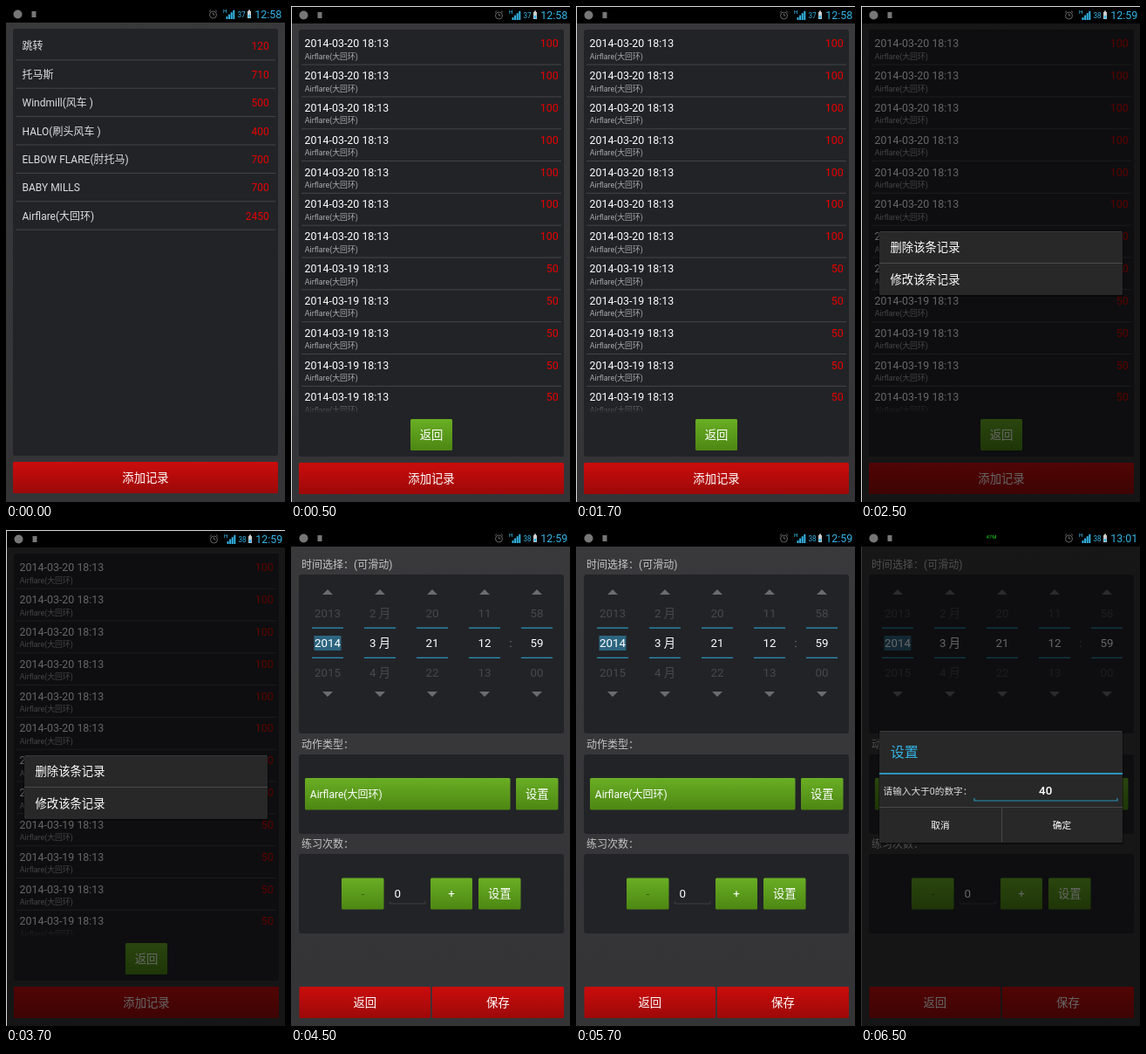
An HTML page that plays this animation: 320x568 px, repeating every 8 s.

```html
<!DOCTYPE html>
<html lang="zh-CN">
<head>
<meta charset="utf-8">
<style>
html, body { margin: 0; height: 100%; overflow: hidden; background: #000; }
svg { display: block; width: 100%; height: 100%; }
text { font-family: Roboto, "Noto Sans CJK SC", "Noto Sans CJK JP", sans-serif; white-space: pre; }
.colon { font-family: "Noto Sans CJK JP", "Noto Sans CJK TC", sans-serif; }
</style>
</head>
<body>
<svg viewBox="0 0 320 568">
  <defs>
    <linearGradient id="back" x2="0" y2="1"><stop stop-color="#39393b"/><stop offset="1" stop-color="#343437"/></linearGradient>
    <linearGradient id="red" x2="0" y2="1"><stop stop-color="#cb0c0c"/><stop offset="1" stop-color="#9c0909"/></linearGradient>
    <linearGradient id="green" x2="0" y2="1"><stop stop-color="#69ae24"/><stop offset="1" stop-color="#4d8713"/></linearGradient>
    <linearGradient id="fade" x2="0" y2="1"><stop stop-color="#222327" stop-opacity="0"/><stop offset="1" stop-color="#222327"/></linearGradient>
  </defs>
  <g id="stage"></g>
</svg>
<script>
const BLUE = '#33b5e5', RED = '#e80000', PANEL = '#222327';
const stage = document.getElementById('stage');

const rect = (x, y, w, h, fill, r = 0, more = '') =>
  `<rect x="${x}" y="${y}" width="${w}" height="${h}" fill="${fill}" rx="${r}" ${more}/>`;
const path = (d, fill, stroke = 'none', width = 1) =>
  `<path d="${d}" fill="${fill}" stroke="${stroke}" stroke-width="${width}"/>`;
const text = (x, y, str, size, fill = '#fff', anchor = 'start', weight = 400) =>
  `<text x="${x}" y="${y}" font-size="${size}" fill="${fill}" text-anchor="${anchor}" font-weight="${weight}">` +
  str.replace('：', '<tspan class="colon">：</tspan>') + '</text>';
const group = (x, y, body) => `<g transform="translate(${x} ${y})">${body}</g>`;
const panel = (y, h, x = 9) => rect(x, y, 304, h, PANEL, 3);
const button = (x, y, w, h, label, fill = 'url(#green)', color = '#fff') =>
  rect(x, y, w, h, fill, 1.5) +
  text(x + w / 2, y + h / 2 + 4.8, label, 13.33, color, 'middle');
const redButton = (x, w, y, label) => button(x, y, w, 36, label, 'url(#red)');
const backdrop = () => rect(0, 0, 320, 568, 'url(#back)');
const dim = () => rect(1, 19, 319, 549, '#000', 0, 'opacity=".6"');

function status(clock, charge) {
  let bars = '';
  for (let i = 0; i < 4; i++) bars += rect(252.5 + i * 2.6, 12 - i * 2.4, 2, 3 + i * 2.4, BLUE);
  return rect(-1, -1, 322, 20, '#000') +
    '<circle cx="13.5" cy="9.5" r="5" fill="#777"/>' +
    rect(29.5, 6, 5, 7, '#777') +
    '<circle cx="237.5" cy="10" r="4" fill="none" stroke="#666"/>' +
    path('M237.5 7.5V10H239.5M232.8 6.5L235 4.5M240 4.5L242.2 6.5', 'none', '#666') +
    text(249, 8, 'H', 6, BLUE, 'start', 500) + bars +
    text(265.5, 13, charge, 8.2, BLUE) +
    rect(278, 4.5, 2, 1.5, '#ccc') + rect(277, 6, 4, 8, '#ccc') + rect(277.8, 10, 2.4, 3.3, BLUE) +
    text(285.2, 14, clock, 12.44, BLUE);
}

const moves = [['跳转', 120], ['托马斯', 710], ['Windmill(风车 )', 500], ['HALO(刷头风车 )', 400],
  ['ELBOW FLARE(肘托马)', 700], ['BABY MILLS', 700], ['Airflare(大回环)', 2450]];

function totals() {
  const rows = moves.map(([name, count], i) => {
    const y = i * 32.4;
    return text(18.5, 50.4 + y, name, 12, '#ddd') +
      text(301.7, 50.4 + y, String(count), 12, RED, 'end') +
      rect(11, 61.3 + y, 298, 1, '#444548');
  });
  return backdrop() + status('12:58', '37') + panel(26, 489, 8) + rows.join('') +
    redButton(8, 304, 522, '添加记录');
}

function history(clock, charge) {
  let rows = '';
  for (let i = 0; i < 12; i++) {
    const y = i * 36.82;
    rows += text(15.5, 47.3 + y, `2014-03-${i < 7 ? 20 : 19} 18:13`, 12.44) +
      text(15.7, 60.8 + y, 'Airflare(大回环)', 8.89, '#aaa') +
      text(306.7, 47.3 + y, i < 7 ? '100' : '50', 12.44, RED, 'end');
    if (i < 11) rows += rect(12, 66.6 + y, 298, 1, '#444548');
  }
  return backdrop() + group(1, 1, status(clock, charge)) + panel(27, 489) + rows +
    rect(12, 451, 298, 15.5, 'url(#fade)') + rect(12, 466, 298, 6, PANEL) +
    button(137, 473, 48, 36, '返回') + redButton(9, 304, 523, '添加记录');
}

const edge = () => rect(0, 0, 320, 1, '#d8d8d8') + rect(0, 0, 1, 568, '#d8d8d8');

const sheet = (y, h) => rect(20, y, 281, h + 2, '#000', 2, 'opacity=".4"') +
  rect(21, y, 279, h, '#282828', 1.5) + rect(22, y, 277, 1, '#3a3a3a');

const menu = () => dim() + sheet(258, 73) + rect(21, 294, 279, 1, '#484848') +
  text(33.5, 281.3, '删除该条记录', 13.33) + text(33.5, 317.8, '修改该条记录', 13.33);

const wheels = [['2013', '2014', '2015'], ['2 月', '3 月', '4 月'], ['20', '21', '22'],
  ['11', '12', '13'], ['58', '59', '00']];

function form(clock) {
  const picker = wheels.map((values, i) => group(42 + i * 60, 0,
    path('M-6 74L0 68L6 74ZM-6 185L0 191L6 185Z', '#6c6c6e') +
    rect(-18, 111.5, 36, 1.3, '#2b8fb5') + rect(-18, 145.7, 36, 1.3, '#2b8fb5') +
    (i ? '' : rect(-15.5, 121, 31, 17, '#2c6580')) +
    values.map((v, k) => text(0, 100 + k * 34, v, 13.33, k == 1 ? '#fff' : '#48494c', 'middle')).join('')));
  const label = (y, str) => text(12, y, str, 12, '#c4c4c4');
  return backdrop() + group(1, 0, status(clock, '38')) +
    label(44, '时间选择：(可滑动)') + panel(51, 182) + picker.join('') +
    text(252, 133.5, ':', 12, '#888', 'middle') +
    label(249.5, '动作类型：') + panel(257, 91) +
    rect(16, 284, 235.5, 36.5, 'url(#green)', 1.5) + text(21.8, 306.5, 'Airflare(大回环)', 12) +
    button(258, 284, 48.5, 36.5, '设置') +
    label(364, '练习次数：') + panel(371, 91) +
    button(58, 398.5, 48.5, 36, '-', 'url(#green)', '#35600c') +
    text(118.5, 421.3, '0', 13.33) +
    path('M113.5 425V428H154V425', 'none', '#47484b', .8) +
    button(160, 398.5, 48, 36, '+') + button(215, 398.5, 48.5, 36, '设置') +
    redButton(9.5, 150.5, 523, '返回') + redButton(161.8, 151.2, 523, '保存');
}

const prompt = () => dim() + text(149.5, 9.8, '47M', 6, '#12d812', 'middle') + sheet(230, 128) +
  text(33.7, 260, '设置', 16, BLUE) + rect(21, 278, 279, 2, '#2a94bb') +
  text(25.5, 303, '请输入大于0的数字：', 10.67, '#ddd') +
  text(211.7, 303, '40', 13.33, '#fff', 'middle', 500) +
  path('M130 307V310H294V307', 'none', '#2a94bb', 1.2) +
  rect(21, 317, 279, 1, '#484848') + rect(161, 318, 1, 39, '#484848') +
  text(91, 342, '取消', 10.67, '#fff', 'middle', 500) +
  text(230.5, 342, '确定', 10.67, '#fff', 'middle', 500);

const scenes = [
  [0, totals],
  [500, () => history('12:58', '37') + edge()],
  [2500, () => history('12:59', '38') + menu() + edge()],
  [4500, () => form('12:59')],
  [6500, () => form('13:01') + prompt()]
];

let shown = null;
function draw(now) {
  const t = now % 8000;
  const [, scene] = scenes.filter(([start]) => start <= t).pop();
  if (scene !== shown) stage.innerHTML = (shown = scene)();
  requestAnimationFrame(draw);
}
draw(0);
</script>
</body>
</html>
```
